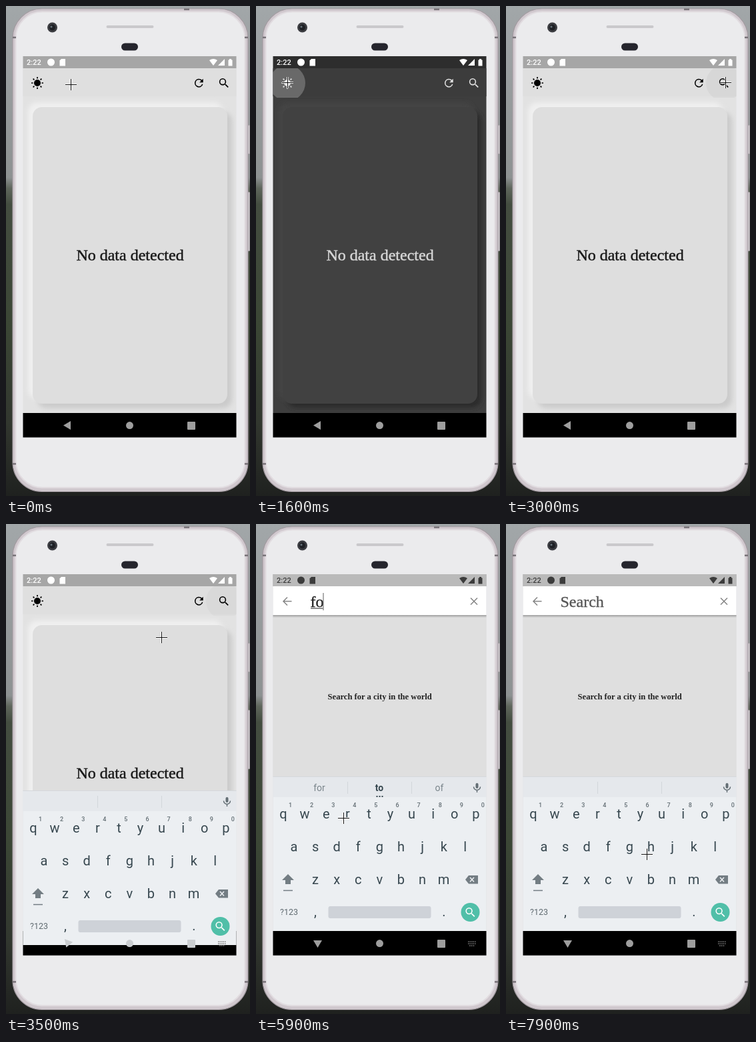
An HTML page for the animation above (8000 ms loop, 366 by 732 pixels).

```html
<!DOCTYPE html>
<html lang="en">
<head>
<meta charset="utf-8">
<title>Phone demo</title>
<style>
  html, body { margin: 0; width: 100%; height: 100%; overflow: hidden; background: #333; }
  svg { display: block; width: 100%; height: 100%; }
  .serif { font-family: "Liberation Serif", "Times New Roman", serif; }
  .sans { font-family: Roboto, sans-serif; }
  .mid { text-anchor: middle; }
</style>
</head>
<body>
<svg viewBox="0 0 366 732" xmlns="http://www.w3.org/2000/svg">
  <defs>
    <linearGradient id="field" x2="0" y2="1">
      <stop offset="0" stop-color="#a2a7a9"/><stop offset=".35" stop-color="#8d9192"/>
      <stop offset=".372" stop-color="#5f665c"/><stop offset=".405" stop-color="#444d40"/>
      <stop offset=".66" stop-color="#3b4635"/><stop offset=".85" stop-color="#32372f"/>
      <stop offset="1" stop-color="#1f211f"/>
    </linearGradient>
    <linearGradient id="drop" x2="0" y2="1">
      <stop offset="0" stop-color="#000" stop-opacity=".3"/>
      <stop offset="1" stop-color="#000" stop-opacity="0"/>
    </linearGradient>
    <filter id="soft" x="-10%" y="-10%" width="120%" height="120%"><feGaussianBlur stdDeviation="3.5"/></filter>
    <clipPath id="pageClip"><rect x="25" y="93" width="321" height="515"/></clipPath>
    <clipPath id="barClip"><rect x="25" y="93" width="321" height="44"/></clipPath>
    <clipPath id="screenClip"><rect x="25.500" y="75" width="320" height="569.500"/></clipPath>
    <path id="lens" d="M15.5 14h-.79l-.28-.27A6.47 6.47 0 0 0 16 9.5 6.5 6.5 0 1 0 9.5 16c1.61 0 3.09-.59 4.23-1.57l.27.28v.79l5 4.99L20.49 19zm-6 0a4.5 4.5 0 1 1 0-9 4.5 4.5 0 0 1 0 9z"/>
    <path id="cross" d="M-8 .5H9M.5 -8V9"/>
    <g id="status" fill="currentColor">
      <text class="sans" x="31" y="88" font-size="11" font-weight="500">2:22</text>
      <circle cx="67.5" cy="84" r="5.5"/>
      <path d="M83 79h6v10.500h-8.500v-8z"/>
      <path d="M305 81q6-4 12 0l-6 8zM328 79v10h-10zM333.500 80.500h1.500v-1.500h3v1.500h1.500v9h-6z"/>
    </g>
  </defs>

  <rect width="366" height="732" fill="url(#field)"/>
  <g fill="#d8d4d8" stroke="#9c969b" stroke-width=".7">
    <rect x="361" y="178" width="4.500" height="43" rx="1"/>
    <rect x="361" y="278" width="4.500" height="88" rx="1"/>
  </g>
  <rect x="10" y="4" width="353" height="721.500" rx="44" fill="#d0c8ce" stroke="#a39ba1" stroke-width="1.200"/>
  <rect x="14.500" y="8.500" width="344" height="711" rx="40" fill="#ebebed" stroke="#e1dce0" stroke-width="2"/>
  <path d="M10 47h5M358 47h5M10 684h5M358 684h5M267 5h8" stroke="#777277" stroke-width="2.500"/>
  <rect x="150.500" y="29" width="71" height="4" rx="2" fill="#cac9cc"/>
  <rect x="173" y="55.500" width="25" height="11" rx="5.500" fill="#25252d"/>
  <circle cx="69.500" cy="32" r="7.500" fill="#3b3c41"/>
  <circle cx="69.500" cy="32" r="4.500" fill="#1d1f24"/>
  <circle cx="68" cy="31" r="1.600" fill="#66717a"/>

  <g clip-path="url(#screenClip)">
    <rect id="statusBar" x="25" y="75" width="321" height="18"/>
    <use href="#status" color="#fff"/>
    <g clip-path="url(#pageClip)">
      <rect id="bg" x="25" y="93" width="321" height="515"/>
      <g filter="url(#soft)">
        <rect id="lo" x="40" y="151" width="292" height="443" rx="14"/>
        <rect id="hi" x="40" y="151" width="292" height="443" rx="14"/>
      </g>
      <rect id="card" x="40" y="151" width="292" height="443" rx="14"/>
      <rect id="bar" x="25" y="93" width="321" height="42"/>
      <text id="noData" class="serif mid" x="186" y="380" font-size="24" stroke-width=".45">No data detected</text>
    </g>
    <g clip-path="url(#barClip)"><circle id="ripple" cy="115" r="27"/></g>
    <g id="icons">
      <circle cx="47" cy="115" r="5"/>
      <g id="rays"></g>
      <path transform="translate(279.700 105.500) scale(.8)" d="M17.650 6.350A8 8 0 1 0 19.730 14h-2.080A6 6 0 1 1 12 6c1.660 0 3.140.69 4.220 1.780L13 11h7V4z"/>
      <use href="#lens" transform="translate(317.400 105.600) scale(.8)"/>
    </g>

    <g id="search">
      <rect x="25" y="75" width="321" height="18" fill="#bababa"/>
      <use href="#status" color="#3c3c3c"/>
      <rect x="25" y="93" width="321" height="515" fill="#dfdfdf"/>
      <rect x="25" y="93" width="321" height="43" fill="#fff"/>
      <rect x="25" y="136" width="321" height="4" fill="url(#drop)"/>
      <path d="M53.500 115.500H42M47 109.500l-6 6 6 6M322 110.500l10 10M332 110.500l-10 10" fill="none" stroke="#858585" stroke-width="1.500"/>
      <text id="query" class="serif" x="81.500" y="124" font-size="24" stroke-width=".35"></text>
      <path id="underline" stroke="#222" stroke-width="1.200"/>
      <path id="caret" stroke="#777" stroke-width="1.200"/>
      <text class="serif mid" x="185.700" y="262" font-size="12.600" font-weight="700" fill="#222">Search for a city in the world</text>
    </g>

    <rect x="25" y="608" width="321" height="37" fill="#000"/>
    <g id="keyboard" class="sans" fill="#37474f">
      <rect x="25" y="377" width="321" height="231" fill="#eceff2"/>
      <rect x="25" y="377" width="321" height="31" fill="#e5e8ec"/>
      <path d="M25 377.500h321" stroke="#d5d8dc"/>
      <path d="M137.500 385v18M233.500 385v18" stroke="#d2d6da"/>
      <g id="hints" class="mid" font-size="14"></g>
      <g fill="none" stroke="#636e74" stroke-width="1.500">
        <rect x="329.500" y="387" width="4" height="8" rx="2" fill="#636e74" stroke="none"/>
        <path d="M326.500 392.500a5 5 0 0 0 10 0M331.500 398v3"/>
      </g>
      <g id="keys" class="mid"></g>
      <path d="M48 523l9 9h-5v6h-8v-6h-5z" fill="#737d83"/>
      <path d="M41 547.500h14" stroke="#737d83" stroke-width="1.500"/>
      <path d="M319 525h14v12.500h-14l-5-6.250z" fill="#737d83"/>
      <path d="M321 528l6 6.500M327 528l-6 6.500" stroke="#eceff2" stroke-width="1.500"/>
      <rect x="108.500" y="571" width="154" height="18" rx="3" fill="#ced2d8"/>
      <circle cx="321.500" cy="580" r="14" fill="#50bfa8"/>
      <use href="#lens" transform="translate(312 570.500) scale(.8)" fill="#fff"/>
    </g>
    <g id="nav">
      <path id="back" d="M86 626.500l11-6.500v13z"/>
      <circle cx="185.500" cy="626.600" r="5.500"/>
      <rect x="272" y="621" width="12" height="12" rx="1"/>
      <path id="ime" d="M318 624h12M318 627h12M320 630h8" fill="none" stroke="#777" stroke-width="1.500" stroke-dasharray="1.500 1"/>
    </g>
  </g>
  <g id="cursor">
    <use href="#cross" stroke="#fff" stroke-width="3" opacity=".8"/>
    <use href="#cross" stroke="#111"/>
  </g>
</svg>
<script>
const LOOP = 8000, STEP = 100;
const el = id => document.getElementById(id);
const set = (id, attrs) => { for (const k in attrs) el(id).setAttribute(k, attrs[k]); };
const grey = v => `rgb(${[v, v, v].map(Math.round)})`;
const mix = (a, b, p) => a + (b - a) * p;

// Grey levels for each theme, and the reach of the card's shadows
const themes = [
  { status: 166, bar: 223, bg: 226, card: 222, hi: 240, lo: 203, icon: 0, text: 25, reach: 7 },
  { status: 98, bar: 125, bg: 132, card: 128, hi: 250, lo: 222, icon: 8, text: 128, reach: 4.5 },
  { status: 45, bar: 60, bg: 62, card: 65, hi: 69, lo: 42, icon: 225, text: 215, reach: 6 }
];

// Rows of [time, value...]
const darkness = [[900, 0], [1000, .5], [1100, .85], [1200, 1], [1600, 1], [1700, .5], [1800, 0]];
const sunRipple = [[900, 0], [1000, 1], [1100, .5], [1200, 0], [1500, 0], [1600, 1], [1700, .5], [1800, 0]];
const lensRipple = [[2900, 0], [3000, 1], [3500, .8], [3600, 0]];
const keyboardDrop = [[3300, 270], [3400, 95], [3500, 21], [3600, 5], [3700, 0]];
const searchFade = [[3500, 0], [3600, .5], [3700, .9], [3800, 1]];
const backTurn = [[3300, 0], [3400, -35], [3500, -70], [3600, -90]];
const pointer = [
  [300, 97, 117], [700, 47, 114], [1800, 47, 114], [2400, 334, 125], [2600, 329, 114],
  [3100, 329, 114], [3500, 233, 169], [3900, 205, 300], [4700, 162, 470], [4900, 153, 491],
  [5100, 160, 488], [5400, 308, 440], [5600, 300, 437], [5900, 131, 439], [6100, 135, 439],
  [6300, 327, 583], [6500, 310, 164], [6800, 332, 116], [7100, 332, 116], [7900, 211, 493]
];
const edits = [
  [3600, "", ""], [4900, "f", "for,f,of"], [5500, "fo", "for,to,of"],
  [6000, "for", "four,for,form"], [7100, "", ""]
];

function at(rows, t) {
  const n = rows.findIndex(r => r[0] > t);
  if (n === 0) return rows[0].slice(1);
  if (n < 0) return rows[rows.length - 1].slice(1);
  const [a, b] = [rows[n - 1], rows[n]];
  return a.slice(1).map((v, i) => mix(v, b[i + 1], (t - a[0]) / (b[0] - a[0])));
}

function themeAt(d) {
  const [a, b] = d < .5 ? themes : themes.slice(1);
  const p = d < .5 ? d * 2 : d * 2 - 1;
  return Object.fromEntries(Object.keys(a).map(k => [k, mix(a[k], b[k], p)]));
}

const label = (x, y, s, size, extra = "") => `<text x="${x}" y="${y}" font-size="${size}" ${extra}>${s}</text>`;

function buildKeys() {
  let out = "";
  [["qwertyuiop", 41], ["asdfghjkl", 57], ["zxcvbnm", 89]].forEach(([row, x], r) =>
    [...row].forEach((c, i) => {
      out += label(x + i * 32.1, 440 + r * 49, c, 20);
      if (!r) out += label(51.5 + i * 32.1, 423, (i + 1) % 10, 9, 'fill="#626d73" font-weight="500"');
    }));
  el("keys").innerHTML = out + label(49.5, 584, "?123", 12.5, 'fill="#5f6a70"') + label(89, 586, ",", 20) + label(282, 586, ".", 20);
  el("rays").innerHTML = [...Array(8).keys()].map(i =>
    `<path transform="rotate(${i * 45} 47 115)" d="M47 106v2.500" stroke-width="1.700"/>`).join("");
}

function drawPage(t) {
  const th = themeAt(at(darkness, t)[0]);
  set("statusBar", { fill: grey(th.status) });
  for (const k of ["bar", "bg", "card", "hi", "lo"]) set(k, { fill: grey(th[k]) });
  set("hi", { transform: `translate(${-th.reach} ${-th.reach})` });
  set("lo", { transform: `translate(${th.reach} ${th.reach})` });
  set("noData", { fill: grey(th.text), stroke: grey(th.text) });
  set("icons", { fill: grey(th.icon), stroke: "none" });
  set("rays", { stroke: grey(th.icon) });
  const onSun = t < 2500;
  set("ripple", {
    cx: onSun ? 47 : 327,
    fill: onSun ? "#fff" : "#000",
    opacity: onSun ? at(sunRipple, t)[0] * (t < 1300 ? .07 : .23) : at(lensRipple, t)[0] * .035
  });
}

function drawSearch(t) {
  set("search", { opacity: at(searchFade, t)[0] });
  const [since, text, words] = edits.filter(e => e[0] <= t).pop() || edits[0];
  const query = el("query"), ink = text ? "#222" : "#555";
  query.textContent = text || "Search";
  set("query", { fill: ink, stroke: ink });
  const end = 81.5 + (text ? query.getComputedTextLength() : 0);
  set("underline", { d: `M82 126H${end - 1}`, opacity: text ? 1 : 0 });
  const on = Math.floor((t - since) / 500) % 2 === 0;
  set("caret", { d: `M${end - .5} 103V129`, opacity: on ? 1 : 0 });
  el("hints").innerHTML = words && words.split(",").map((w, i) =>
    label(95 + i * 90, 399, w, 14, i === 1 ? 'font-weight="700"' : 'fill="#7b868c"')).join("") +
    '<path d="M180.500 407h10" stroke="#37474f" stroke-width="2" stroke-dasharray="2"/>';
}

function drawKeyboard(t) {
  const drop = at(keyboardDrop, t)[0], open = t >= 3400;
  set("keyboard", { transform: `translate(0 ${drop})` });
  set("nav", { fill: drop > 0 && open ? "#cacdd0" : "#9e9e9e" });
  set("back", { transform: `rotate(${at(backTurn, t)[0]} 92.500 626.500)` });
  set("ime", { opacity: open ? 1 : 0 });
}

function draw(time) {
  const t = Math.floor((time % LOOP) / STEP + 1e-6) * STEP;
  drawPage(t);
  drawSearch(t);
  drawKeyboard(t);
  const [x, y] = at(pointer, t).map(Math.round);
  set("cursor", { transform: `translate(${x} ${y})` });
}

buildKeys();
draw(0);
const start = performance.now();
(function tick() {
  draw(Math.max(0, performance.now() - start));
  requestAnimationFrame(tick);
})();
</script>
</body>
</html>
```
